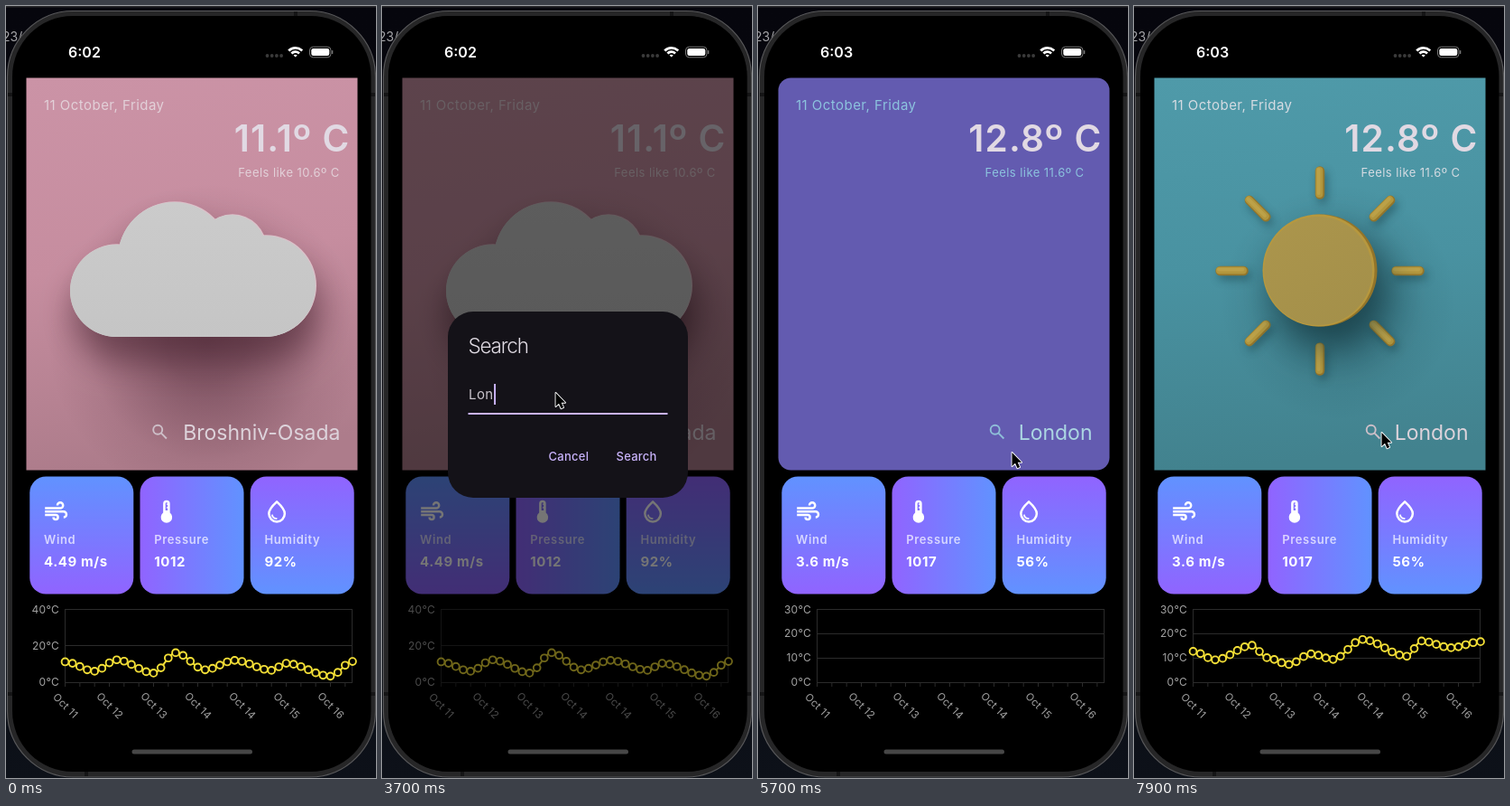
Write an HTML page with a canvas that moves like this. It is 410 by 854 pixels and loops after 8000 ms.

```html
<!DOCTYPE html>
<html lang="en">
<head>
<meta charset="utf-8">
<title>Weather search</title>
<style>
html, body { margin: 0; width: 100%; height: 100%; overflow: hidden; background: #07070e; }
canvas { display: block; }
</style>
</head>
<body>
<canvas width="410" height="854"></canvas>
<script>
const c = document.querySelector('canvas').getContext('2d');
const TAU = Math.PI * 2, LOOP = 8000;
const BLUE = '#6192ff', PURPLE = '#9064ff', YELLOW = '#f3df37', LILAC = '#c9b3fb';

// highs and lows: [sample, degrees], eased in between
const cloudy = {
  time: '6:02', temp: '11.1º C', feels: 'Feels like 10.6º C', mid: 313.5,
  city: 'Broshniv-Osada', icon: 170.5, wind: '4.49 m/s', pressure: '1012', humidity: '92%',
  max: 40, step: 20,
  peaks: [[0, 11.2], [4, 6], [7, 12.3], [12, 5], [15, 16.2], [19, 6.8], [23, 12], [28, 6.5], [30, 10.4], [36, 3.3], [39, 11.4]]
};
const sunny = {
  time: '6:03', temp: '12.8º C', feels: 'Feels like 11.6º C', mid: 306.5,
  city: 'London', icon: 265, wind: '3.6 m/s', pressure: '1017', humidity: '56%',
  max: 30, step: 10,
  peaks: [[0, 12.7], [3, 9.2], [8, 15.2], [10, 10.1], [13, 7.3], [16, 11.7], [19, 9.4], [23, 17.6], [29, 10.7], [31, 17], [35, 14.2], [39, 16.7]]
};

const clamp = v => Math.max(0, Math.min(1, v));
const span = (t, a, b) => clamp((t - a) / (b - a));
const smooth = p => p * p * (3 - 2 * p);
const mix = (a, b, p) => a + (b - a) * p;

function text(s, x, y, size, color, weight = 400, spacing = 0, align = 'left') {
  c.font = `${weight} ${size}px Inter, Roboto, sans-serif`;
  c.letterSpacing = spacing + 'px';
  c.textAlign = align;
  c.fillStyle = color;
  c.fillText(s, x, y);
}
function box(x, y, w, h, r, fill) {
  c.beginPath();
  c.roundRect(x, y, w, h, r);
  c.fillStyle = fill;
  c.fill();
}
function disc(x, y, r, fill) {
  c.beginPath();
  c.arc(x, y, r, 0, TAU);
  c.fillStyle = fill;
  c.fill();
}
function outline(color, width, path) {
  c.strokeStyle = color;
  c.lineWidth = width;
  path ? c.stroke(new Path2D(path)) : c.stroke();
}
function ramp(x0, y0, x1, y1, ...colors) {
  const g = c.createLinearGradient(x0, y0, x1, y1);
  colors.forEach((k, i) => g.addColorStop(i / (colors.length - 1), k));
  return g;
}
function shadow(color = 'transparent', blur = 0, x = 0, y = 0) {
  c.shadowColor = color;
  c.shadowBlur = blur;
  c.shadowOffsetX = x;
  c.shadowOffsetY = y;
}
function fillCard(fill) {
  c.fillStyle = fill;
  c.fillRect(22, 79, 368, 435);
}
function glow(x, y, r, rgb, a) {
  const g = c.createRadialGradient(x, y, 0, x, y, r);
  for (let p = 0; p <= 1; p += .25) g.addColorStop(p, `rgba(${rgb},${a * (1 - smooth(p))})`);
  fillCard(g);
}

function phone() {
  c.fillStyle = ramp(0, 0, 0, 854, '#06060d', '#07070e', '#0d1119');
  c.fillRect(0, 0, 410, 854);
  c.fillStyle = '#29292c';
  c.fillRect(0, 0, 410, 1.5);
  text('23/', -4, 39, 14, '#a5a5a8');
  box(1.5, 5.5, 408, 847.5, 73, '#262627');
  outline('#58585a', 1.2);
  c.fillStyle = '#151516';
  c.fillRect(319, 6, 4, 5);
  c.fillRect(87, 847, 4, 5);
  for (const x of [2, 404]) for (const y of [96, 759]) c.fillRect(x, y, 5, 4);
  box(7, 11, 397.5, 836, 67, '#000');
}

function statusBar(time) {
  text(time, 69, 57, 16, '#fff', 600);
  for (let i = 0; i < 4; i++) disc(289.5 + i * 5.2, 55, 1.9, '#3b3b3b');
  c.lineCap = 'butt';
  for (const r of [1.5, 5.9, 10.2]) {
    c.beginPath();
    c.arc(320.7, 56.5, r, -Math.PI * .76, -Math.PI * .24);
    outline('#fff', 2.7);
  }
  box(336.5, 45.2, 23.5, 11.6, 3.8, '#000');
  outline('#777', 1);
  box(338.3, 47, 20, 8, 2.3, '#fff');
  box(361, 49, 1.3, 4, .6, '#777');
  box(139.5, 822.5, 133.5, 5, 2.5, '#474747');
}

function cloudArt() {
  fillCard(ramp(23, 80, 80, 513, '#cb93a6', '#c68d9f', '#ad7c8b'));
  glow(222, 372, 175, '70,34,48', .55);
  const p = new Path2D();
  for (const [x, y, r] of [[122, 315, 51], [186, 279, 62], [250, 269, 38], [287, 310, 56]]) {
    p.moveTo(x + r, y);
    p.arc(x, y, r, 0, TAU);
  }
  p.rect(122, 280, 165, 86);
  shadow('rgba(62,28,40,.55)', 36, 4, 26);
  c.fillStyle = '#c9c9c9';
  c.fill(p);
  shadow();
  c.save();
  c.translate(1, -.7);
  c.fillStyle = '#dcc0c9';
  c.fill(p);
  c.restore();
  c.fillStyle = ramp(0, 217, 0, 366, '#cbcbcb', '#c5c5c5');
  c.fill(p);
}

function sunArt() {
  fillCard(ramp(23, 80, 60, 513, '#4f9aa9', '#4992a1', '#42828e'));
  glow(226, 328, 130, '22,62,72', .5);
  c.lineCap = 'round';
  for (let a = 0; a < TAU; a += TAU / 8) {
    const ray = (shift, color, width) => {
      c.beginPath();
      for (const r of [84.5, 110.5]) c.lineTo(206 + shift + r * Math.cos(a), 293 + shift + r * Math.sin(a));
      outline(color, width);
    };
    shadow('rgba(20,58,66,.45)', 10, 3, 5);
    ray(0, '#92752b', 10.5);
    shadow();
    ray(-.6, '#b2963c', 8);
    ray(-1.4, '#bca148', 4);
  }
  shadow('rgba(18,52,60,.65)', 36, 10, 22);
  disc(207.5, 292.5, 62, '#92742a');
  shadow();
  disc(204.5, 292.5, 62, '#b7983e');
  disc(204, 293, 60, ramp(160, 235, 240, 350, '#ab954c', '#a4904a'));
}

function picture(d, loading) {
  c.save();
  c.beginPath();
  c.roundRect(22.5, 79.5, 367, 434, loading ? 14 : 0);
  c.clip();
  if (loading) fillCard('#635bb0');
  else if (d === cloudy) cloudArt();
  else sunArt();
  c.restore();
  const soft = loading ? '#8cc3de' : d === cloudy ? '#e2d0d8' : '#d5dbe2';
  text('11 October, Friday', 42, 115, 15, soft, 400, .47);
  text(d.temp, 381.5, 160.5, 40.5, '#e1d9e3', 600, 1.2, 'right');
  text(d.feels, d.mid, 189, 13, soft, 400, .45, 'center');
  text(d.city, 370.5, 480, 23, loading ? '#abd6e2' : '#ddd3db', 400, 0, 'right');
  c.lineCap = 'butt';
  c.beginPath();
  c.arc(d.icon - 2.3, 468.8, 5, 0, TAU);
  c.moveTo(d.icon + 1.6, 472.7);
  c.lineTo(d.icon + 7.4, 478.5);
  outline(loading ? '#8fbfd8' : '#cdbfc8', 1.9);
}

// icons live on a 24-unit grid
const icons = {
  Wind() {
    outline('#fff', 2, 'M2 9H15.5A2.5 2.5 0 1 0 13 6.5M2 12H18.5a2.5 2.5 0 0 1 0 5M2 15H11.5a2 2 0 1 1-2 2');
  },
  Pressure() {
    c.fillStyle = '#fff';
    c.fill(new Path2D('M15 13V5a3 3 0 0 0-6 0v8a5 5 0 1 0 6 0ZM11 11V5a1 1 0 0 1 2 0h-1v1h1v2h-1v1h1v2Z'), 'evenodd');
  },
  Humidity() {
    outline('#fff', 2, 'M12 3.3C7.5 7.4 5 10.8 5 13.8a7 7.2 0 0 0 14 0C19 10.8 16.5 7.4 12 3.3Z');
    outline('#fff', 1.5, 'M7.8 14.7a4 4 0 0 0 4.4 3.5');
  }
};
function tile(x, label, value, fill) {
  box(x, 520.5, 115, 130, 18, fill);
  text(label, x + 15.7, 595, 13, 'rgba(255,255,255,.7)', 600, .65);
  text(value, x + 15.7, 620, 15, '#fff', 700, .6);
  c.save();
  c.translate(x + 14.4, 544.3);
  c.scale(1.25, 1.25);
  icons[label]();
  c.restore();
}
function tiles(d) {
  tile(26.3, 'Wind', d.wind, ramp(0, 521, 0, 650, BLUE, PURPLE));
  tile(148.5, 'Pressure', d.pressure, ramp(149, 0, 263, 0, PURPLE, BLUE));
  tile(270.7, 'Humidity', d.humidity, ramp(0, 521, 0, 650, PURPLE, BLUE));
}

function degrees(peaks, x) {
  const i = Math.max(1, peaks.findIndex(p => x <= p[0]));
  const [a, b] = [peaks[i - 1], peaks[i]];
  return mix(a[1], b[1], smooth(span(x, a[0], b[0])));
}
function chart({ peaks, max, step }, reveal, dots) {
  const px = i => 65.5 + i * 318.5 / 39, py = v => 748 - v * 80.5 / max;
  c.beginPath();
  for (let v = 0; v <= max; v += step) {
    const y = Math.floor(py(v)) + .5;
    c.moveTo(65, y);
    c.lineTo(384, y);
    text(v + '°C', 59, py(v) + 4, 12, '#a3a3a3', 400, .25, 'right');
  }
  for (const x of [65.5, 383.5]) { c.moveTo(x, 667); c.lineTo(x, 748); }
  for (let i = 0; i < 40; i += 2) { c.moveTo(px(i), 748); c.lineTo(px(i), 753); }
  outline('#2b2b2b', 1);
  for (let i = 0; i < 7; i++) {
    c.save();
    c.translate(66 + i * 49, 774);
    c.rotate(Math.PI / 4);
    text('Oct ' + (11 + i - (i > 3)), 0, 4, 11.5, '#a3a3a3', 400, .3, 'center');
    c.restore();
  }
  c.beginPath();
  for (let i = 0; i <= 39 * reveal; i += .1) c.lineTo(px(i), py(degrees(peaks, i)));
  c.lineJoin = 'round';
  if (reveal) outline(YELLOW, 2);
  c.globalAlpha = dots;
  for (let i = 0; dots && i < 40; i++) {
    disc(px(i), py(degrees(peaks, i)), 3.9, '#000');
    outline(YELLOW, 1.9);
  }
  c.globalAlpha = 1;
}

function dialog(t) {
  const alpha = span(t, 2000, 2180) * (1 - span(t, 5280, 5430));
  if (!alpha) return;
  c.globalAlpha = alpha;
  box(7, 11, 397.5, 836, 67, 'rgba(0,0,0,.54)');
  box(73, 338, 266, 206, 28, '#141218');
  text('Search', 95.5, 384, 22.5, '#e0dbe3', 300, -1.2);

  const first = 3100, gap = 230;
  const count = Math.max(0, Math.min(6, Math.floor((t - first) / gap) + 1));
  const typed = 'London'.slice(0, count);
  const since = t - (count ? first + (count - 1) * gap : 2150);
  text(typed, 96, 435, 15, '#cac5cd', 400, .4);
  c.fillStyle = LILAC;
  if (since % 1000 < 500) c.fillRect(96.5 + c.measureText(typed).width, 418, 2, 23);
  c.fillRect(95.5, 450, 221, 2);

  if (t > 4850) box(248, 480, 69, 37, 18.5, '#1a1720');
  if (t > 5100) disc(282, 495, 6 + 6 * span(t, 5100, 5200), '#292533');
  text('Cancel', 184.5, 503, 13, LILAC, 500, .25);
  text('Search', 259.5, 503, 13, LILAC, 500, .25);
  c.globalAlpha = 1;
}

// pointer moves: start, end, x, y
const moves = [[1000, 1500, 168, 467], [2050, 2600, 193, 428], [4300, 4900, 282, 494], [5900, 6250, 286, 491], [6400, 6950, 275, 472]];
function pointer(t) {
  let x = 425, y = 570;
  for (const [from, to, tx, ty] of moves) {
    const p = smooth(span(t, from, to));
    x = mix(x, tx, p);
    y = mix(y, ty, p);
  }
  c.save();
  c.translate(x - .5, y);
  c.lineJoin = 'round';
  const arrow = 'M0 0V15L3.5 11.8L6 17.3L8.6 16.1L6.2 10.8H10.6Z';
  outline('#fff', 1.8, arrow);
  c.fillStyle = '#000';
  c.fill(new Path2D(arrow));
  c.restore();
}

function draw(t) {
  phone();
  const done = t >= 5500, d = done ? sunny : cloudy;
  if (done || t < 5150) {
    const p = done ? span(t, 5990, 7190) : 1;
    picture(d, done && t < 5900);
    tiles(d);
    chart(d, 1 - (1 - p) ** 2, done ? span(t, 7115, 7340) : 1);
  }
  dialog(t);
  statusBar(d.time);
  pointer(t);
}

function frame() {
  draw(performance.now() % LOOP);
  requestAnimationFrame(frame);
}
frame();
</script>
</body>
</html>
```
